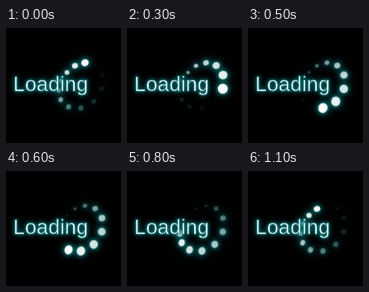
Animation, 144 px wide and 144 px high, one loop 1.2 s. Source, as an HTML page:

```html
<!DOCTYPE html>
<html lang="en">
<head>
<meta charset="utf-8">
<title>Loading</title>
<style>
  html, body { margin: 0; width: 100%; height: 100%; overflow: hidden; background: #000; }
  svg { display: block; width: 100vw; height: 100vh; }
  .ring { filter: drop-shadow(0 0 2px #078f93) drop-shadow(0 0 4px #07898d); }
  .dot { animation: fade 1200ms infinite steps(4); }
  /* One step per 100 ms: each dot lights up, then shrinks and dims. */
  @keyframes fade {
    0% { opacity: 1; fill: #fff; transform: scale(1); }
    33.3333% { opacity: .76; fill: #dce6e4; transform: scale(.7); }
    66.6667% { opacity: .15; fill: #8fb8b8; transform: scale(.46); }
    100% { opacity: 0; fill: #3c8c8c; transform: scale(.35); }
  }
  text {
    font: 26px "Liberation Sans", Arial, sans-serif;
    letter-spacing: .2px;
    fill: #fff;
    stroke: #0b6f73;
    stroke-width: .6px;
    filter: drop-shadow(0 0 1.5px #07777b) drop-shadow(0 0 3px #066468);
  }
</style>
</head>
<body>
<svg viewBox="0 0 144 144">
  <g id="ring"></g>
  <text x="9" y="78.5">Loading</text>
</svg>
<script>
  const COUNT = 12, STEP = 100;
  const { cos, sin, PI } = Math;
  const rad = deg => deg * PI / 180;
  const ring = document.getElementById("ring");
  ring.setAttribute("class", "ring");

  const make = (name, parent, attrs) => {
    const el = document.createElementNS("http://www.w3.org/2000/svg", name);
    for (const key in attrs) el.setAttribute(key, attrs[key]);
    return parent.appendChild(el);
  };

  // A tilted ring: a skewed ellipse plus a small double-speed circle for perspective.
  for (let i = 0; i < COUNT; i++) {
    const a = 2 * PI * i / COUNT;
    const x = 91.6 + 10.3 * cos(a) + 25.3 * sin(a) - 3 * cos(2 * a);
    const y = 71.1 - 27.6 * cos(a) + 5 * sin(a) - 3.1 * sin(2 * a);
    const tilt = -22 * cos(a);
    // Dots nearest the viewer, at the lower right, are largest.
    const rx = 4.8 + 1.4 * cos(a - rad(95));
    const ry = 4.9 + 1.5 * cos(a - rad(120));

    const place = make("g", ring, { transform: `translate(${x} ${y}) rotate(${tilt})` });
    const dot = make("ellipse", place, { class: "dot", rx, ry });
    dot.style.animationDelay = `${(i - COUNT) * STEP}ms`;
  }
</script>
</body>
</html>
```
